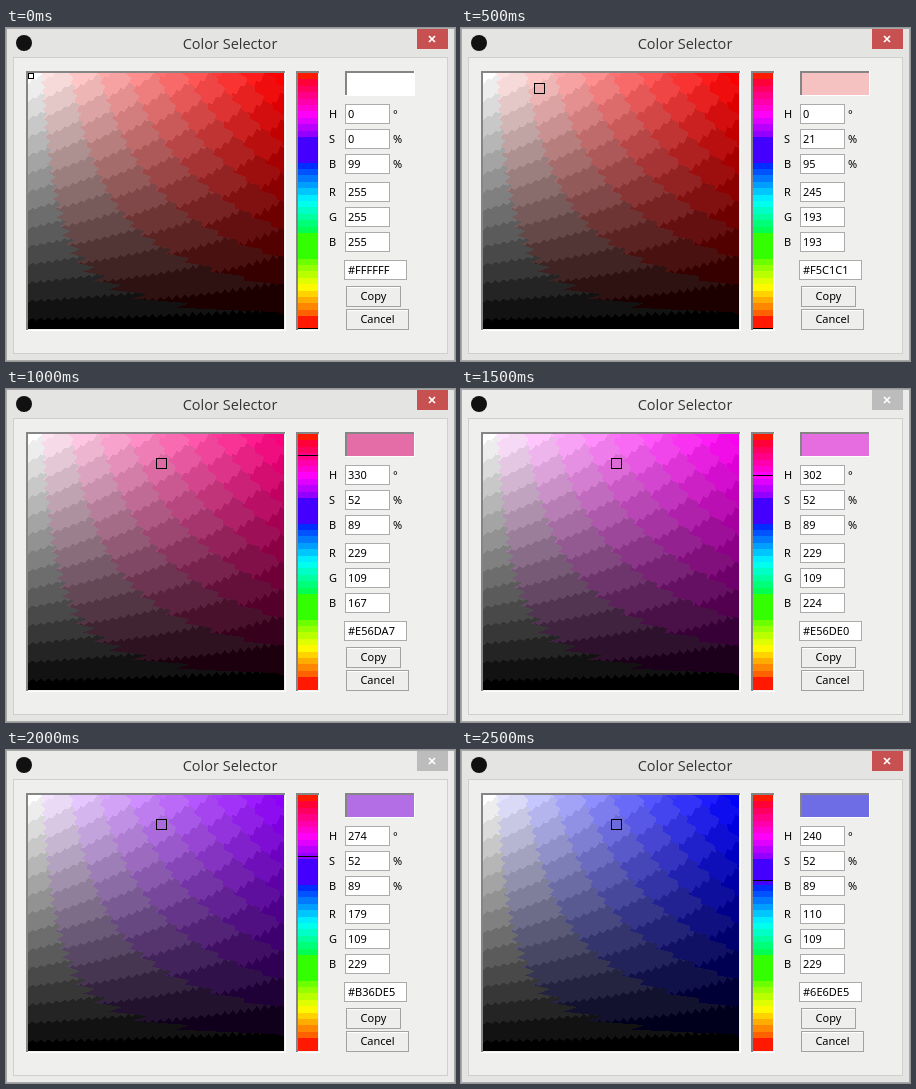
An HTML page with a canvas for the animation above (3000 ms loop, 449 by 333 pixels).

```html
<!DOCTYPE html>
<html>
<head>
<meta charset="utf-8">
<style>
html, body { margin: 0; width: 100%; height: 100%; overflow: hidden; background: #eff0ee; }
canvas, svg { position: absolute; left: 0; top: 0; }
#field { left: 22px; top: 45px; }
text { font: 11px "Noto Sans", sans-serif; fill: #000; }
.title { font: 14.5px "Open Sans", sans-serif; fill: #333; }
</style>
</head>
<body>
<canvas id="field" width="256" height="256"></canvas>
<svg id="ui" width="449" height="333" shape-rendering="crispEdges">
  <path id="frame" fill-rule="evenodd" d="M0 0H449V333H0ZM8 30V325H441V30Z"/>
  <rect x=".5" y=".5" width="448" height="332" fill="none" stroke="#a8a8a6"/>
  <rect x="7.5" y="29.5" width="434" height="296" fill="none" stroke="#cfd0ce"/>
  <circle cx="18" cy="15" r="8" fill="#111" shape-rendering="auto"/>
  <text class="title" x="224" y="21" text-anchor="middle">Color Selector</text>
  <rect id="close" x="411" y="1" width="31" height="20"/>
  <path d="M423 8l6 6m0-6l-6 6" stroke="#fff" stroke-width="1.7" shape-rendering="auto"/>
</svg>
<script>
const FRAME_MS = 500;
// hue, saturation, brightness, red, green, blue, marker x, marker y
const states = [
  [0, 0, 99, 255, 255, 255, 22, 45],
  [0, 21, 95, 245, 193, 193, 78, 60],
  [330, 52, 89, 229, 109, 167, 155, 74],
  [302, 52, 89, 229, 109, 224, 155, 74],
  [274, 52, 89, 179, 109, 229, 155, 74],
  [240, 52, 89, 110, 109, 229, 155, 74]
];
const ui = document.getElementById('ui');
const ctx = document.getElementById('field').getContext('2d');
const image = ctx.createImageData(256, 256);

function add(tag, attrs, content = '') {
  const el = document.createElementNS('http://www.w3.org/2000/svg', tag);
  for (const name in attrs) el.setAttribute(name, attrs[name]);
  el.textContent = content;
  return ui.appendChild(el);
}
const rect = (x, y, width, height, fill, stroke = 'none') =>
  add('rect', { x, y, width, height, fill, stroke });
const label = (x, y, content, anchor = 'start') =>
  add('text', { x, y, 'text-anchor': anchor }, content);
const line = (d, stroke, width = 1) =>
  add('path', { d, stroke, 'stroke-width': width, fill: 'none' });

function sunken(x, y, w, h) {
  line(`M${x + 1} ${y + h}V${y + 1}H${x + w}`, '#858585', 2);
  line(`M${x + w - .5} ${y}V${y + h - .5}H${x}`, '#fff');
}
function button(y, w, content) {
  rect(340.5, y + .5, w - 1, 20, '#eeefed', '#a2a2a2');
  line(`M341 ${y + 1.5}H${339 + w}`, '#fff');
  label(340 + w / 2, y + 14, content, 'middle');
}

// Hue strip, coarse steps with broad red, green and blue bands
for (let i = 0; i < 40; i++) {
  let hue = 360 - (i + .5) * 9;
  if (hue > 351 || hue < 18) hue = 6;
  else if (hue > 238 && hue < 268) hue = 256;
  else if (hue > 98 && hue < 132) hue = 108;
  rect(292, 45 + i * 6.4, 20, 6.5, `hsl(${hue} 100% 50%)`);
}
sunken(20, 43, 260, 260);
sunken(290, 43, 24, 260);

const swatch = rect(341, 45, 67, 22, '#fff');
sunken(339, 43, 70, 25);

const values = [...'HSBRGB'].map((name, i) => {
  const y = 76 + i * 25 + (i > 2 ? 3 : 0);
  label(323, y + 14, name);
  rect(339.5, y + .5, 44, 19, '#fff', '#aaabaa');
  if (i < 3) label(387, y + 14, i ? '%' : '°');
  return label(342, y + 14, '');
});
rect(338.5, 232.5, 62, 19, '#fff', '#aaabaa');
const hex = label(342, 246, '');
button(258, 55, 'Copy');
button(281, 63, 'Cancel');

const marker = line('', '#000');
const hueLine = line('', '#000');

const wave = n => Math.abs(n % 1 - .5) - .25;

// Colours fall into stepped cells of equal chroma and lightness
function paintField(hue) {
  const pure = [0, 120, 240].map(offset => {
    const d = Math.abs((hue - offset + 540) % 360 - 180);
    return Math.min(1, Math.max(0, 2 - d / 60));
  });
  const k = .55, chromaSteps = 9, lightSteps = 14;
  for (let y = 0, p = 0; y < 256; y++) {
    for (let x = 0; x < 256; x++) {
      const v = 1 - y / 255, c = v * x / 255;
      const col = Math.round((c + .03 * wave(y / 9)) * chromaSteps);
      const shift = col % 3 / 3;
      const light = (v - k * c + .02 * wave(x / 8)) * lightSteps;
      const chroma = Math.max(0, col / chromaSteps);
      const row = (Math.round(light + shift) - shift) / lightSteps;
      const bright = Math.min(1, Math.max(0, row + k * chroma));
      const tint = Math.min(chroma, bright);
      for (const part of pure) image.data[p++] = 255 * (bright - tint * (1 - part));
      image.data[p++] = 255;
    }
  }
  ctx.putImageData(image, 0, 0);
}

function show(index) {
  const state = states[index], [hue] = state, rgb = state.slice(3, 6);
  const [x, y] = state.slice(6);
  const active = index < 3 || index > 4;
  document.getElementById('frame').setAttribute('fill', active ? '#e4e5e2' : '#ebebea');
  document.getElementById('close').setAttribute('fill', active ? '#c75050' : '#bcbcbc');
  values.forEach((el, i) => el.textContent = state[i]);
  hex.textContent = '#' + rgb.map(n => n.toString(16).padStart(2, '0')).join('').toUpperCase();
  swatch.setAttribute('fill', `rgb(${rgb})`);
  const left = Math.max(22, x - 5) + .5, top = Math.max(45, y - 5) + .5;
  marker.setAttribute('d', `M${left} ${top}H${x + 5.5}V${y + 5.5}H${left}Z`);
  const hueY = Math.min(300, Math.floor(45 + (360 - hue) / 360 * 256)) + .5;
  hueLine.setAttribute('d', `M292 ${hueY}H312`);
  paintField(hue);
}

let current = -1;
function tick() {
  const index = Math.floor(performance.now() / FRAME_MS) % states.length;
  if (index !== current) show(current = index);
  requestAnimationFrame(tick);
}
tick();
</script>
</body>
</html>
```
